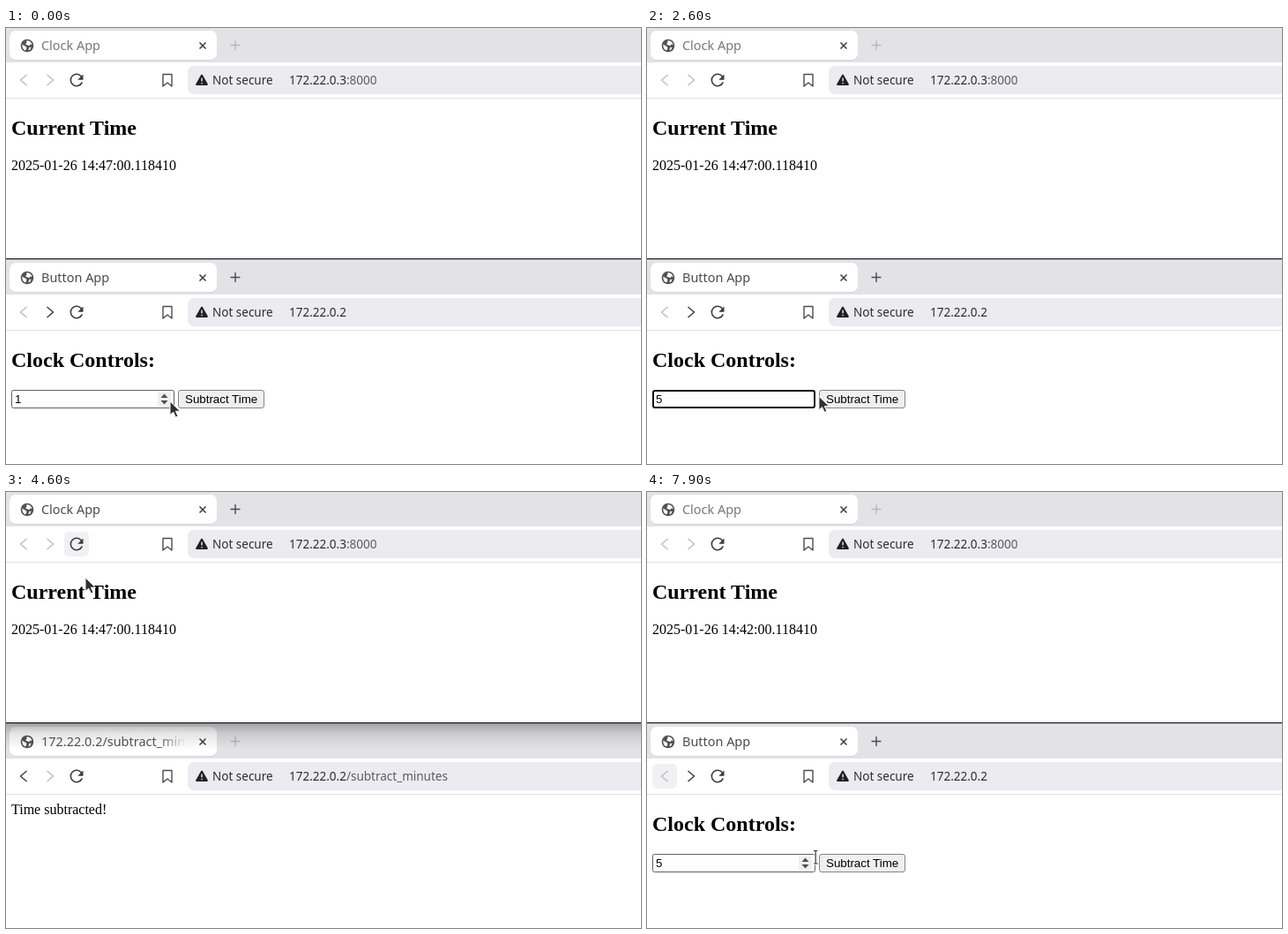
Animation of 720 by 494 pixels, one loop 8000 ms. Source, as an HTML page:

```html
<!DOCTYPE html>
<html lang="en">
<head>
<meta charset="utf-8">
<title>Clock demo</title>
<style>
  html, body { margin: 0; width: 100%; height: 100%; overflow: hidden; background: #fff; }
  svg { display: block; }
  text { white-space: pre; }
  .ui { font-family: "Noto Sans", "Open Sans", sans-serif; }
  .tab { font-size: 14.45px; }
  .url { font-size: 13.5px; }
  .page { font: 16px "Liberation Serif", "Times New Roman", serif; }
  .head { font: bold 24px "Liberation Serif", "Times New Roman", serif; }
  .form { font: 13.333px "Liberation Sans", Arial, sans-serif; }
  .line { fill: none; stroke-width: 1.4; }
</style>
</head>
<body>
<svg id="stage" width="720" height="494" viewBox="0 0 720 494"></svg>
<script>
const stage = document.getElementById('stage');
const LOOP = 8000, STEP = 100;
const DARK = '#3b3b41', FAINT = '#bdbdc1';

const defs = `<defs>
  <linearGradient id="shade" x1="0" y1="0" x2="0" y2="1">
    <stop offset="0" stop-color="#000" stop-opacity=".29"/>
    <stop offset=".4" stop-color="#000" stop-opacity=".1"/>
    <stop offset="1" stop-color="#000" stop-opacity="0"/>
  </linearGradient>
  <linearGradient id="fade" gradientUnits="userSpaceOnUse" x1="172" y1="0" x2="205" y2="0">
    <stop offset="0" stop-color="#55555a"/>
    <stop offset="1" stop-color="#55555a" stop-opacity="0"/>
  </linearGradient>
  <filter id="soft" x="-10%" y="-30%" width="120%" height="170%">
    <feDropShadow dx="0" dy="2" stdDeviation="3" flood-opacity=".22"/>
  </filter>
</defs>`;

// Pointer way points: time, x, y
const path = [
  [0, 185, 422], [100, 185, 422], [300, 182, 415], [2500, 182, 415],
  [2800, 228, 420], [3500, 228, 404], [3600, 222, 395], [4300, 79, 58],
  [4500, 79, 60], [4600, 89, 96], [5300, 128, 320], [5600, 139, 365],
  [5900, 139, 365], [6200, 17, 325], [7500, 17, 325], [7900, 191, 414]
];

function pointer(t) {
  const i = path.findIndex(p => p[0] > t);
  if (i < 0) return path[path.length - 1].slice(1);
  const [t0, x0, y0] = path[i - 1], [t1, x1, y1] = path[i];
  const u = (t - t0) / (t1 - t0), k = u * u * (3 - 2 * u);
  return [x0 + (x1 - x0) * k, y0 + (y1 - y0) * k];
}

const text = (x, y, cls, s, fill = '#000') =>
  `<text x="${x}" y="${y}" class="${cls}" fill="${fill}">${s}</text>`;
const box = (x, y, w, h, fill, more = '') =>
  `<rect x="${x}" y="${y}" width="${w}" height="${h}" fill="${fill}" ${more}/>`;
const line = (d, color, more = '') =>
  `<path class="line" d="${d}" stroke="${color}" ${more}/>`;
const cross = (x, y, r, color, width = 1.4) =>
  line(`M${x - r} ${y - r}l${2 * r} ${2 * r}m0 ${-2 * r}l${-2 * r} ${2 * r}`, color, `style="stroke-width:${width}"`);

const globe = scale => `<g transform="translate(24 20) scale(${scale})">
  <circle r="7.3" fill="#505056"/>
  <path fill="#fff" d="M-5.6-1.5L-2.5 .6-1 1.1-.6 3.2-2 5.6C-4.5 4.7-6 2-5.6-1.5zM-.5-5.8C2.4-6 5-4 5.7-1.2L3.6-1.6 2.2 .2 .2-.8-1.9-1.2-.8-3.2z"/>
  <path fill="#fff" d="M2 2.3l2.6-.8-1.2 2.9-1.9 1z"/></g>`;

const reload = line('M85.6 55.2A6.7 6.7 0 1 0 86.3 61.4', DARK, 'style="stroke-width:1.6"') +
  `<path d="M87.5 52.5v6.2h-6.2z" fill="${DARK}"/>`;

function browser(o) {
  const plus = o.focus ? '#4a4a50' : '#b9b9bd';
  const title = o.long ? 'url(#fade)' : o.focus ? '#4a4a4f' : '#77777b';
  const refresh = o.stop ? cross(80, 59, 4.8, o.stop) : reload;
  return `<g transform="translate(0 ${o.y})">` +
    box(0, -1, 720, 40, '#e3e2e7') +
    box(4, 3.5, 235, 33.5, '#cfced4', 'rx="7" opacity=".7"') +
    box(4, 3, 235, 33, '#fff', 'rx="7"') +
    globe(o.busy ? .8 : 1) +
    text(40, 25, 'ui tab', o.title, title) +
    cross(223, 20, 3.5, DARK, 1.5) +
    line('M254.5 19.5h11m-5.5-5.5v11', plus) +
    (o.focus ? '' : o.y ? box(0, -1, 720, 30, 'url(#shade)') : '') +
    box(0, 39, 720, 41, '#fff') + box(0, 79, 720, 1, '#e2e1e5') +
    (o.hover ? box(o.hover - 14, 45, 28, 28, '#f1f0f2', 'rx="5"') : '') +
    line('M23.5 53l-7 6 7 6', o.back ? DARK : FAINT) +
    line('M46.5 53l7 6-7 6', o.next ? DARK : FAINT) +
    refresh +
    line('M178 52.5h10v13.5l-5-4-5 4z', '#4d4d53', 'stroke-linejoin="round"') +
    box(206, 43, 530, 32, '#ecebf0', 'rx="7"') +
    '<path d="M222 53.5L228 64H216z" fill="#202024" stroke="#202024" stroke-width="1.8" stroke-linejoin="round"/>' +
    box(221.4, 56.5, 1.3, 4, '#fff') + box(221.4, 62, 1.3, 1.3, '#fff') +
    text(234, 64, 'ui url', 'Not secure', '#2c2c32') +
    text(321, 64, 'ui url', `${o.host}<tspan fill="#5b5b61">${o.rest}</tspan>`, '#2c2c32') +
    '</g>';
}

function controls(t, value) {
  const active = t >= 700 && t < 3000, over = t < 2600 || t >= 7900;
  const field = active
    ? box(7, 411, 183, 19, '#fff', 'rx="2" stroke="#101010" stroke-width="2"')
    : box(6.5, 410.5, 184, 20, '#fff', 'rx="2" stroke="#5f5f5f"');
  const hot = t >= 300 && t < 2600;
  const spin = !over ? '' : box(172, 413, 15, 15, hot ? '#d2d2d2' : '#efefef') +
    '<path d="M175.5 419l4-4.5 4 4.5zM175.5 422l4 4.5 4-4.5z" fill="#505050"/>';
  const pressed = t >= 2700 && t < 3000;
  return text(6, 384, 'head', 'Clock Controls:') + field +
    text(10, 425, 'form', value) + spin +
    box(195.5, 410.5, 97, 20, pressed ? '#e3e3e3' : '#efefef', 'rx="2.5" stroke="#858585"') +
    text(203, 425, 'form', 'Subtract Time');
}

function cursor(t) {
  if (t >= 3000 && t < 3500) return '';
  const [x, y] = pointer(t);
  const shape = t >= 7900
    ? line('M-2-7.5h2.2v14.5m-2.2 0h5M.2-7.5h2', '#fff', 'style="stroke-width:3"') +
      line('M-2-7.5h2.2v14.5m-2.2 0h5M.2-7.5h2', '#333', 'style="stroke-width:1.2"')
    : '<path d="M1 1V16.5L4.7 13.2 7.3 19 10 17.8 7.4 12.2H12.5z" fill="#303033" stroke="#fff" stroke-width="1"/>';
  return `<g transform="translate(${x.toFixed(1)} ${y.toFixed(1)})">${shape}</g>`;
}

const tooltip = box(27.5, 341.5, 252, 27, '#fff', 'stroke="#3c3c3c" filter="url(#soft)"') +
  `<text x="35" y="360" class="ui" font-size="14.33" fill="#4a4a4f">Click to go back, hold to see history</text>`;

function draw(t) {
  const topFocus = t >= 4500 && t < 7400;
  const sent = t >= 3000 && t < 7500;
  const loading = t >= 3000 && t < 3200;
  const done = t >= 3200 && t < 7500;
  const value = 1 + [700, 1100, 1500, 1900].filter(click => t >= click).length;
  const minute = t < 5000 ? 47 : 42;

  stage.innerHTML = defs + box(0, 0, 720, 494, '#fff') +
    browser({
      y: 0, title: 'Clock App', focus: topFocus, host: '172.22.0.3', rest: ':8000',
      hover: t >= 4300 && t < 4700 && 80, stop: t >= 4800 && t < 6100 && FAINT
    }) +
    text(6, 121, 'head', 'Current Time') +
    text(6, 161, 'page', `2025-01-26 14:${minute}:00.118410`) +
    browser({
      y: 263, title: sent ? '172.22.0.2/subtract_min' : 'Button App', long: sent,
      focus: !topFocus, busy: loading, host: '172.22.0.2', rest: sent ? '/subtract_minutes' : '',
      back: sent, next: !sent, hover: t >= 6200 && 20, stop: loading && DARK
    }) +
    box(0, 261, 720, 1.2, '#17171b') +
    (done ? text(6, 365, 'page', 'Time subtracted!') : controls(t, value)) +
    (t >= 6800 && t < 7400 ? tooltip : '') +
    cursor(t);
}

let shown = -1;
function tick(now) {
  const t = Math.floor(now % LOOP / STEP) * STEP;
  if (t !== shown) draw(shown = t);
  requestAnimationFrame(tick);
}
draw(0);
requestAnimationFrame(tick);
</script>
</body>
</html>
```
